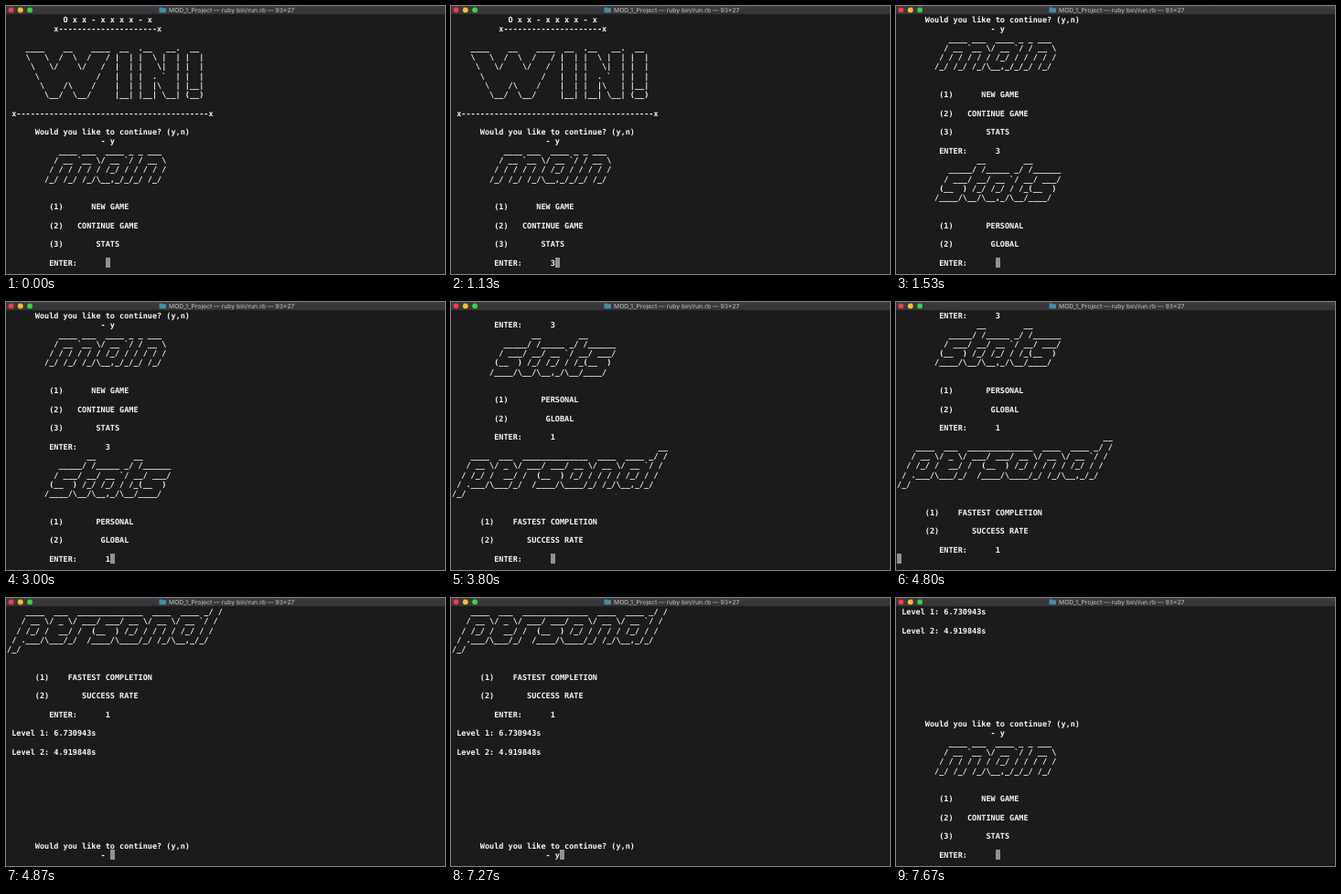
These frames come from a looping animation (480x294 px, 8000 ms). An HTML page:

```html
<!DOCTYPE html>
<html lang="en">
<head>
<meta charset="utf-8">
<title>Terminal</title>
<style>
html, body { margin: 0; width: 100%; height: 100%; overflow: hidden; background: #1b1b1b; }
#stage { position: relative; width: 480px; height: 294px; overflow: hidden; background: #1b1b1b; }
#bar { position: absolute; left: 0; top: 0; width: 480px; height: 9px; background: linear-gradient(#3c3c40, #343438); }
#bar svg { position: absolute; left: 0; top: 0; }
#bar text { font: 500 6.75px Inter, "Open Sans", sans-serif; fill: #b4b4b4; text-rendering: geometricPrecision; }
#view { position: absolute; left: 1px; top: 11px; width: 478px; height: 277.5px; }
#screen {
  position: absolute; margin: 0; left: 0; top: 0; color: #f8f8f8; white-space: pre;
  font: bold 8.52px/10.26px "DejaVu Sans Mono", "Liberation Mono", monospace;
  font-variant-ligatures: none; text-rendering: geometricPrecision;
}
#cursor { position: absolute; width: 5.2px; height: 10.5px; background: #929292; }
</style>
</head>
<body>
<div id="stage">
  <div id="bar">
    <svg width="480" height="9" viewBox="0 0 480 9">
      <circle cx="5.500" cy="4.4" r="2.9" fill="#fb3a4a"/>
      <circle cx="15.8" cy="4.4" r="2.9" fill="#fdc02c"/>
      <circle cx="26.1" cy="4.4" r="2.9" fill="#38d63c"/>
      <path d="M167.5 1.5h3l.8 .8h3.7v5h-7.500z" fill="#4c8ba6"/>
      <text x="178" y="6.7">MOD_1_Project — ruby bin/run.rb — 93×27</text>
    </svg>
  </div>
  <div id="view"><pre id="screen"></pre><div id="cursor"></div></div>
</div>
<script>
const ROWS = 27, LINE_H = 10.26, CHAR_W = 5.13, LOOP = 8000;

const pad = (n, s) => ' '.repeat(n) + s;
const art = (col, s) => s.split('\n').slice(1, -1).map(l => pad(col, l));
const rule = (col, n) => pad(col, 'x' + '-'.repeat(n) + 'x');
const gap = n => Array(n).fill('');

// Numbered choices, one blank line after each, then the prompt.
const menu = (col, items, answer) => [
  ...gap(2),
  ...items.flatMap(([at, label], i) => [pad(col, `(${i + 1})`).padEnd(at) + label, '']),
  pad(9, 'ENTER:').padEnd(21) + answer
];

const ask = [pad(6, 'Would you like to continue? (y,n)'), pad(20, '- y')];

const win = art(4, String.raw`
____    __    ____  __  .__   __.  __
\   \  /  \  /   / |  | |  \ |  | |  |
 \   \/    \/   /  |  | |   \|  | |  |
  \            /   |  | |  . ${'`'}  | |  |
   \    /\    /    |  | |  |\   | |__|
    \__/  \__/     |__| |__| \__| (__)
`);

const main = art(8, String.raw`
   ____ ___  ____ _ _ ___
  / __ ${'`'}__ \/ __ ${'`'}/ / __ \
 / / / / / / /_/ / / / / /
/_/ /_/ /_/\__,_/_/_/ /_/
`);

const stats = art(8, String.raw`
         __        __
   _____/ /_____ _/ /______
  / ___/ __/ __ ${'`'}/ __/ ___/
 (__  ) /_/ /_/ / /_(__  )
/____/\__/\__,_/\__/____/
`);

const personal = art(0, String.raw`
                                            __
    ____  ___  ______________  ____  ____ _/ /
   / __ \/ _ \/ ___/ ___/ __ \/ __ \/ __ ${'`'}/ /
  / /_/ /  __/ /  (__  ) /_/ / / / / /_/ / /
 / .___/\___/_/  /____/\____/_/ /_/\__,_/_/
/_/
`);

const mainMenu = [
  ...main,
  ...menu(9, [[18, 'NEW GAME'], [15, 'CONTINUE GAME'], [19, 'STATS']], '3')
];

const log = [
  pad(12, 'O x x - x x x x - x'), rule(10, 21), '',
  ...win, '', rule(1, 41), '',
  ...ask, ...mainMenu,
  ...stats, ...menu(9, [[19, 'PERSONAL'], [20, 'GLOBAL']], '1'),
  ...personal, ...menu(6, [[13, 'FASTEST COMPLETION'], [16, 'SUCCESS RATE']], '1'),
  '', ' Level 1: 6.730943s', '', ' Level 2: 4.919848s', ...gap(9),
  ...ask, ...mainMenu
];

// [time, last line, cursor column]
const steps = [
  [0, 26, 21], [1130, 26, 22],
  [1530, 38, 21], [3000, 38, 22],
  [3800, 51, 21], [4470, 51, 22],
  [4800, 52, 0], [4870, 66, 22],
  [7270, 66, 23], [7600, 67, 0],
  [7670, 79, 21]
];

const screen = document.getElementById('screen');
const cursor = document.getElementById('cursor');
let shown;

function show(step) {
  if (step === shown) return;
  shown = step;
  const [, last, col] = step;
  const lines = log.slice(last - ROWS + 1, last);
  screen.textContent = [...lines, log[last].slice(0, col)].join('\n');
  cursor.style.left = col * CHAR_W + 'px';
  cursor.style.top = (ROWS - 1) * LINE_H - 1.3 + 'px';
}

const start = performance.now();
function tick() {
  const t = (performance.now() - start) % LOOP;
  show(steps.findLast(s => s[0] <= t));
  requestAnimationFrame(tick);
}
tick();
</script>
</body>
</html>
```
